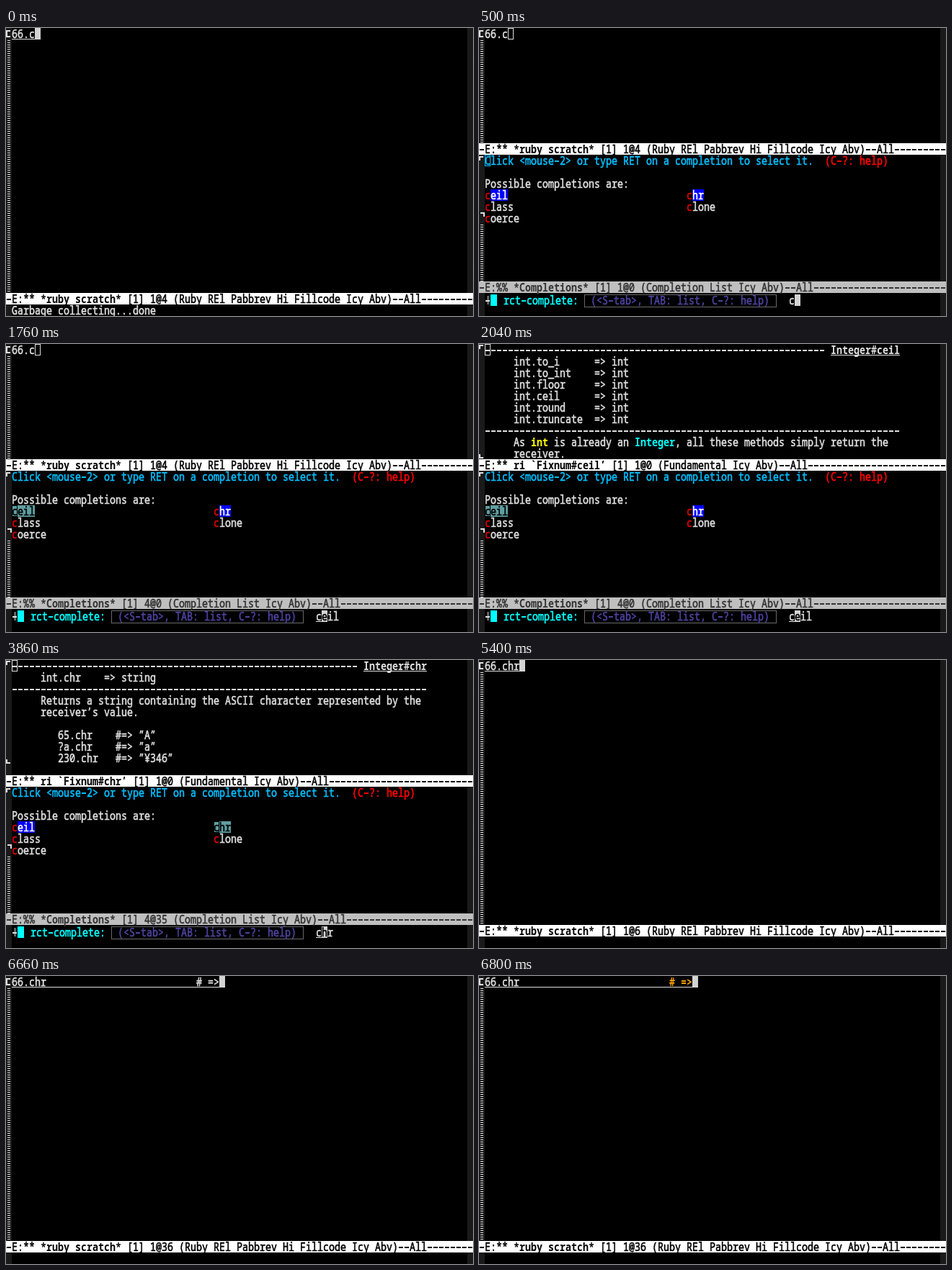
An HTML page with a canvas for the animation above (8 s loop, 648 px wide and 400 px high).

```html
<!DOCTYPE html>
<html>
<head>
<meta charset="utf-8">
<style>
html, body { margin: 0; width: 100%; height: 100%; overflow: hidden; background: #000; }
canvas { display: block; }
</style>
</head>
<body>
<canvas id="stage" width="648" height="400"></canvas>
<script>
const ctx = document.getElementById('stage').getContext('2d');
const W = 8, H = 16, FG = '#e0e0e0', CURSOR = '#d3d3d3', FRINGE = '#1a1a1a', SELECTED = '#5f9ea0';

function box(x, y, w, h, color) {
  ctx.fillStyle = color;
  ctx.fillRect(x, y, w, h);
}

function frame(x, y, w, h, color) {
  ctx.strokeStyle = color;
  ctx.lineWidth = 1;
  ctx.strokeRect(x + .5, y + .5, w - 1, h - 1);
}

// Terminal text: one character per 8 px cell, in a tall, sturdy face.
function textAt(x, y, str, color = FG, bold = false) {
  ctx.fillStyle = ctx.strokeStyle = color;
  ctx.lineWidth = .5;
  ctx.font = (bold ? 'bold ' : '') + '13.33px "Noto Sans Mono", "DejaVu Sans Mono", monospace';
  ctx.textAlign = 'center';
  [...str].forEach((ch, i) => {
    const left = x + i * W;
    if (ch === '-') return ctx.fillRect(left + 1, y + 8, 6, 2);
    if (ch === ' ') return;
    ctx.save();
    ctx.translate(left + 4, y + 14);
    ctx.scale(1, 1.2);
    ctx.fillText(ch, 0, 0);
    if (!bold) ctx.strokeText(ch, 0, 0);
    ctx.restore();
  });
}

const put = (col, row, str, color, bold) => textAt(col * W, row * H, str, color, bold);
const rule = (col, row, end) => put(col, row, '-'.repeat(end - col));

function modeline(row, flags, name, rest, bg, color) {
  box(0, row * H, 648, H, bg);
  put(0, row, '-E:' + flags, color);
  put(6, row, name, color, true);
  put(7 + name.length, row, rest.padEnd(74 - name.length, '-'), color);
}

function emptyLines(top, bottom) {
  for (let y = top + 1; y < bottom; y += 3) box(2, y, 4, 1, FG);
}

function corner(y, right, bottom) {
  box(right ? 2 : 0, bottom ? y + 4 : y, 6, 2, FG);
  box(right ? 6 : 0, y, 2, 6, FG);
}

function bracket() {
  corner(3, false, false);
  corner(7, false, true);
  box(0, 3, 2, 10, FG);
}

function scratch(row, code, pos) {
  bracket();
  emptyLines(H, row * H);
  put(1, 0, code);
  modeline(row, '**', '*ruby scratch*',
    `[1] 1@${pos} (Ruby REl Pabbrev Hi Fillcode Icy Abv)--All`, '#fff', '#000');
}

function editor(code, col) {
  scratch(23, code, col - 1);
  box(W, 15, (col - 1) * W, 1, FG);
  box(col * W, 0, W, H, CURSOR);
}

function manual(method) {
  const title = 'Integer#' + method, col = 73 - title.length;
  corner(1, false, false);
  rule(1, 0, col - 1);
  frame(8, 0, W, H, FG);
  put(col, 0, title, FG, true);
  box(col * W, 15, title.length * W, 1, FG);
  if (method === 'ceil') {
    ['to_i', 'to_int', 'floor', 'ceil', 'round', 'truncate'].forEach((name, i) =>
      put(6, i + 1, ('int.' + name).padEnd(14) + '=> int'));
    rule(1, 7, 73);
    put(6, 8, 'As     is already an        , all these methods simply return the');
    put(9, 8, 'int', '#ffff00', true);
    put(27, 8, 'Integer', '#00ffff', true);
    put(6, 9, 'receiver.');
    corner(153, false, true);
  } else {
    put(6, 1, 'int.chr    => string');
    rule(1, 2, 73);
    put(6, 3, 'Returns a string containing the ASCII character represented by the');
    put(6, 4, 'receiver’s value.');
    put(9, 6, '65.chr    #=> ”A”');
    put(9, 7, '?a.chr    #=> ”a”');
    put(9, 8, '230.chr   #=> ”¥346”');
    corner(138, false, true);
  }
  modeline(10, '**', `ri \`Fixnum#${method}’`,
    '[1] 1@0 (Fundamental Icy Abv)--All', '#fff', '#000');
}

function candidate(col, row, word, pick, method) {
  const x = col * W, y = row * H;
  if (word === pick) {
    box(x, y, word.length * W, H, SELECTED);
    frame(x, y, W, H, '#000');
    return put(col, row, word, '#000');
  }
  if (method) box(x + W, y, (word.length - 1) * W, H, '#0000ff');
  put(col, row, word[0], '#e00000');
  put(col + 1, row, word.slice(1), method ? '#fff' : FG);
}

function completions(pick) {
  corner(178, false, false);
  corner(256, true, false);
  emptyLines(272, 352);
  put(1, 11, 'Click <mouse-2> or type RET on a completion to select it.', '#00bfff');
  put(60, 11, '(C-?: help)', '#ff0000');
  if (!pick) frame(8, 176, W, H, '#00bfff');
  put(1, 13, 'Possible completions are:');
  candidate(1, 14, 'ceil', pick, true);
  candidate(36, 14, 'chr', pick, true);
  candidate(1, 15, 'class', pick);
  candidate(36, 15, 'clone', pick);
  candidate(1, 16, 'coerce', pick);
  const pos = { ceil: '4@0', chr: '4@35' }[pick] || '1@0';
  modeline(22, '%%', '*Completions*',
    `[1] ${pos} (Completion List Icy Abv)--All`, '#bfbfbf', '#333');
  prompt(pick);
}

function prompt(pick) {
  const y = 370, x = 430;
  box(9, y + 8, 6, 2, FG);
  box(12, y + 2, 1, 12, FG);
  box(16, y, 9, 16, '#00ffff');
  textAt(34, y, 'rct-complete:', '#00ffff');
  frame(146, y, 267, 18, '#696969');
  textAt(155, y, '(<S-tab>, TAB: list, C-?: help)', '#4f43a0');
  textAt(x, y, pick || 'c');
  box(x + W, y, W, H, CURSOR);
  if (pick) {
    textAt(x + W, y, pick[1], '#000');
    box(x, y + 15, W, 1, FG);
  }
}

function draw(t) {
  box(0, 0, 648, 400, '#000');
  box(0, 0, 8, 400, FRINGE);
  box(640, 0, 8, 400, FRINGE);
  if (t < 500) {
    editor('66.c', 5);
    put(1, 24, 'Garbage collecting...done');
  } else if (t < 5400) {
    if (t < 2040) {
      scratch(10, '66.c', 4);
      frame(40, 0, W, H, FG);
    } else manual(t < 3860 ? 'ceil' : 'chr');
    completions(t < 1760 ? '' : t < 3300 ? 'ceil' : 'chr');
  } else if (t < 6660) {
    editor('66.chr', 7);
  } else {
    editor('66.chr', 37);
    put(33, 0, '# =>', t < 6800 ? FG : '#ffa500', t >= 6800);
  }
}

function tick(now) {
  draw(now % 8000);
  requestAnimationFrame(tick);
}
requestAnimationFrame(tick);
</script>
</body>
</html>
```
